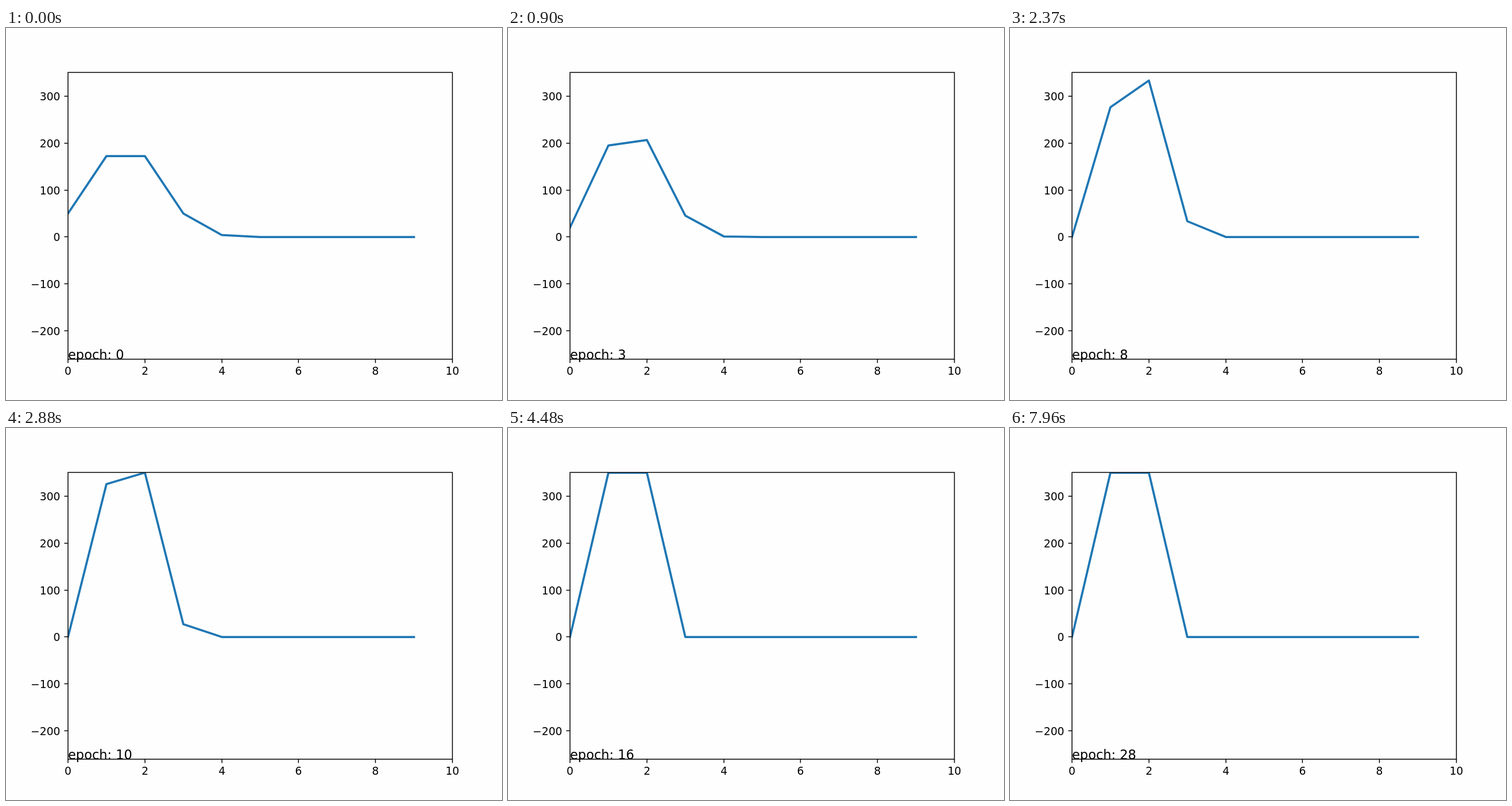
Animation of 864x648 px, one loop 8 s. Source, as an HTML page with a canvas:

```html
<!DOCTYPE html>
<html lang="en">
<head>
<meta charset="utf-8">
<title>Epoch plot</title>
<style>
  html, body { margin: 0; width: 100%; height: 100%; overflow: hidden; background: #fefefe; }
  canvas { display: block; width: 864px; height: 648px; }
</style>
</head>
<body>
<canvas id="plot" width="864" height="648"></canvas>
<script>
const ctx = document.getElementById('plot').getContext('2d');
const LOOP = 8000, STEP = 30, EPOCH = 290, LEAD = 160;

// The figure is laid out at 150 dpi (960 x 720) and drawn at 0.9 scale.
const SCALE = 0.9, PT = 150 / 72;
const box = { l: 120, r: 864, t: 86.4, b: 640.8 };
const yMin = -260, yMax = 350;

const px = x => box.l + x * (box.r - box.l) / 10;
const py = y => box.b - (y - yMin) * (box.b - box.t) / (yMax - yMin);

// The bell curve at the start; the middle points then grow, the rest decay.
const bell = x => 201 * Math.exp(-((x - 1.5) ** 2) / (2 * 0.9 ** 2));

const grow = (a, b) => (v, s) => v * Math.exp(a * s + b * s * s);
const decay = (a, b) => (v, s) => v - a * s - b * s ** 3;
const rules = [
  decay(33.3, 0),
  grow(0.1, 0.042),
  grow(0.154, 0.0525),
  decay(5, 0.355),
  decay(3.3, 0)
];

function valueAt(x, s) {
  if (!rules[x]) return 0;
  return Math.min(yMax, Math.max(0, rules[x](bell(x), s)));
}

function stroke(x0, y0, x1, y1) {
  ctx.beginPath();
  ctx.moveTo(x0, y0);
  ctx.lineTo(x1, y1);
  ctx.stroke();
}

function label(text, x, y, points, align) {
  ctx.font = points * PT + 'px "DejaVu Sans", sans-serif';
  ctx.textAlign = align;
  ctx.fillText(text, x, y);
}

function drawCurve(s) {
  ctx.save();
  ctx.beginPath();
  ctx.rect(box.l, box.t, box.r - box.l, box.b - box.t);
  ctx.clip();
  ctx.beginPath();
  for (let x = 0; x < 10; x++) ctx.lineTo(px(x), py(valueAt(x, s)));
  ctx.strokeStyle = '#1f77b4';
  ctx.lineWidth = 2 * PT;
  ctx.lineJoin = 'round';
  ctx.lineCap = 'square';
  ctx.stroke();
  ctx.restore();
}

function drawAxes() {
  const left = box.l, top = Math.round(box.t), bottom = Math.round(box.b);
  const len = 3.5 * PT;
  ctx.strokeStyle = ctx.fillStyle = '#000';
  ctx.lineWidth = 0.8 * PT;
  ctx.strokeRect(left, top, box.r - left, bottom - top);
  for (let x = 0; x <= 10; x += 2) {
    const p = Math.round(px(x));
    stroke(p, bottom, p, bottom + len);
    label(x, p, 671, 10, 'center');
  }
  for (let y = -200; y <= 300; y += 100) {
    const p = Math.round(py(y));
    stroke(left - len, p, left, p);
    label(String(y).replace('-', '\u2212'), 105, p + 8, 10, 'right');
  }
}

function draw(t) {
  ctx.setTransform(SCALE, 0, 0, SCALE, 0, 0);
  ctx.fillStyle = '#fefefe';
  ctx.fillRect(0, 0, 960, 720);
  drawCurve(Math.floor(t / STEP) * STEP / 1000);
  drawAxes();
  label('epoch: ' + Math.floor((t + LEAD) / EPOCH), box.l, 641, 12, 'left');
}

const start = performance.now();
function tick() {
  draw((performance.now() - start) % LOOP);
  requestAnimationFrame(tick);
}
tick();
</script>
</body>
</html>
```
